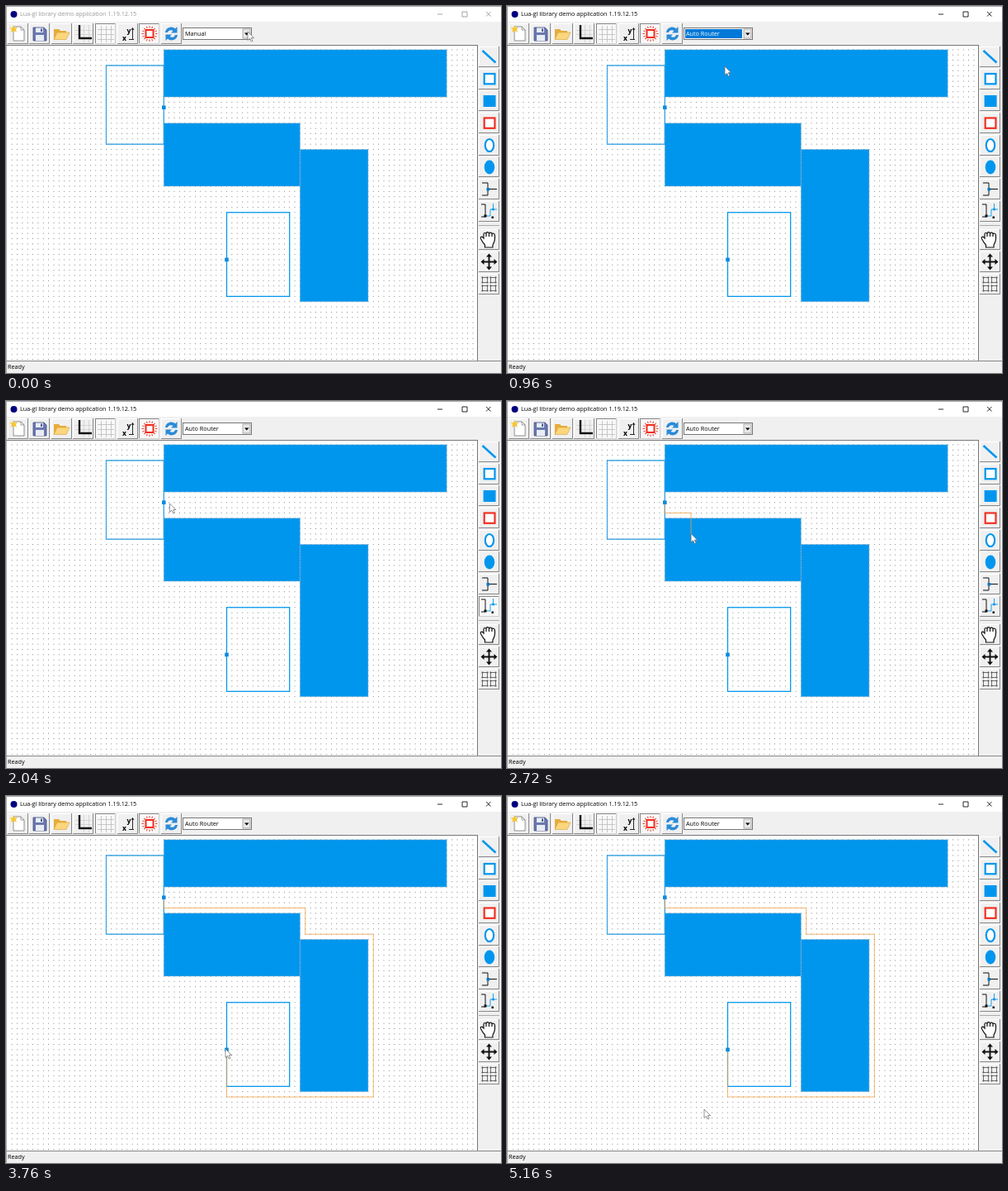
Animation of 600 by 444 pixels, one loop 5.2 s. Source, as an HTML page:

```html
<!DOCTYPE html>
<html lang="en">
<head>
<meta charset="utf-8">
<title>Drawing demo</title>
<style>
html, body { margin: 0; width: 100%; height: 100%; overflow: hidden; background: #fff; }
svg { display: block; width: 600px; height: 444px; }
text { font: 7.25px "Open Sans", "Noto Sans", sans-serif; fill: #000; }
.line { fill: none; stroke: #0096ee; }
.ink { fill: none; stroke: #111; }
.crisp { shape-rendering: crispEdges; }
</style>
</head>
<body>
<svg viewBox="0 0 600 444">
  <!-- window -->
  <rect width="600" height="444" fill="#fff"/>
  <path d="M0 19H600V48H0ZM571 48H600V444H571ZM0 429H600V444H0Z" fill="#f0f0f0"/>
  <path d="M0 .5H600M.5 0V444" stroke="#aaa" class="crisp"/>
  <circle cx="9.5" cy="10" r="4" fill="#00007c"/>
  <text id="title" x="17" y="12.4">Lua-gl library demo application 1.19.12.15</text>
  <path id="controls" d="M523 10H529M553 7H559V13H553ZM582 7L587.500 12.500M587.500 7L582 12.500" fill="none" stroke-width=".9"/>
  <text x="2" y="439">Ready</text>

  <!-- drawing area -->
  <g id="grid" stroke="#444" stroke-width=".8" stroke-dasharray=".8 5.55"></g>
  <path d="M0 47.500H571.500V429" fill="none" stroke="#777" class="crisp"/>
  <path d="M0 429.500H600" stroke="#888" class="crisp"/>
  <g id="shapes"></g>
  <path id="route" fill="none" stroke="#f0a040" stroke-width=".9" opacity=".85"/>
  <g id="ports"></g>

  <!-- buttons and their icons -->
  <g id="buttons" class="crisp"></g>
  <path d="M573 265.500H598" stroke="#aaa" class="crisp"/>

  <path d="M9 25H18L22 29V42H9Z" fill="#fff" stroke="#777" stroke-width=".8"/>
  <path d="M18 25V29H22" fill="none" stroke="#777" stroke-width=".7"/>
  <path d="M9 23L10.500 26.500L14 26L11.800 28.600L13 32L9.500 30L6 32L7 28.500L4.500 26L8 26.500Z" fill="#f8c52c"/>

  <path d="M33 26H46L49 29V42H33Z" fill="#6a78b0" stroke="#444f80" stroke-width=".8"/>
  <path d="M36 26.500H45V32H36ZM36 35H46V42H36Z" fill="#e8edf5"/>
  <path d="M42 27.500H44V31H42Z" fill="#4d628f"/>

  <path d="M58 28H64L66 30H73V40H58Z" fill="#e6ad3b"/>
  <path d="M58 40.500L62 32H77L73 40.500Z" fill="#fbd67c" stroke="#d9a23b" stroke-width=".6"/>

  <path d="M84 29.500H104M84 34.500H104M94.500 23V44M100.500 23V44" stroke="#ccc" stroke-width=".7"/>
  <path d="M89 23V39H104" class="ink" stroke-width="2.400"/>
  <path d="M111 28.500H131M111 34.500H131M111 40.500H131M115.500 24V44M121.500 24V44M127.500 24V44" stroke="#bbb" stroke-width=".8"/>

  <path d="M153.500 27V40M152 29L153.500 26.500L155 29M149 40.500H155" class="ink" stroke-width=".9"/>
  <text x="146.500" y="32.500" style="font-size:8.500px;font-weight:700">y</text>
  <text x="141" y="41.500" style="font-size:8.500px;font-weight:700">x</text>

  <rect x="169.500" y="29" width="9" height="9" fill="#fff" stroke="#f32c1e" stroke-width="2"/>
  <g id="rays" stroke="#e54236" stroke-width="1"></g>

  <g fill="#2a8bd8">
    <path id="half" d="M193 32C194 25 202 24 205 27.500L207.500 25V32.500H200L202.500 30C200 28.500 197 29 196 32Z"/>
    <use href="#half" transform="rotate(180 200.500 33.500)"/>
  </g>

  <path d="M577.500 54L593.500 68.500" class="line" stroke-width="2.500"/>
  <rect x="579.700" y="82" width="12.800" height="12.300" fill="#fff" stroke="#0096ee" stroke-width="2.200"/>
  <rect x="578.600" y="108" width="15" height="14" fill="#0096ee"/>
  <rect x="579.700" y="135.500" width="12.800" height="12.300" fill="#fff" stroke="#f03024" stroke-width="2.200"/>
  <ellipse cx="586" cy="168.500" rx="5.200" ry="7.500" fill="#fff" stroke="#0096ee" stroke-width="2.200"/>
  <ellipse cx="586" cy="195" rx="6.300" ry="8.500" fill="#0096ee"/>

  <path d="M577 214H584V229H577M584 221.500H595" class="ink" stroke-width="1"/>
  <rect x="582.500" y="220" width="3.500" height="3.500" fill="#0878c8"/>

  <path d="M576 240H581V255H576" class="ink" stroke-width="1"/>
  <path d="M581 254H587V246H595M590.500 239V246" class="line" stroke-width=".9"/>
  <path d="M579.500 252.500h3v3h-3ZM588.500 254.500h2.500v2.500h-2.500Z" fill="#111"/>
  <circle cx="590.500" cy="246" r="1.500" fill="#0096ee"/>

  <path d="M579 286L576.500 281.500C575.500 279 578 278.500 579 280L580 281V276C580 274 583 274 583 276C583 273 586.500 273 586.500 275.500C587 273.500 590 273.500 590 276C590.500 274.500 593.500 275 593.500 277.500C594 283 593 286 591 289V292H581.500V289ZM583 276V279M586.500 275.500V279M590 276V279" fill="#fff" stroke="#111" stroke-width="1.200" transform="translate(-1 0)"/>

  <path d="M578 309.500H593M585.500 302V317" class="ink" stroke-width="1.900"/>
  <path d="M585.500 299.500L589 303.500H582ZM585.500 319.500L589 315.500H582ZM575.500 309.500L579.500 306V313ZM595.500 309.500L591.500 306V313Z" fill="#111"/>
  <g id="group" fill="none" stroke="#555" stroke-width=".8"></g>

  <!-- router list -->
  <rect x="214.500" y="26.500" width="83" height="14" fill="#fff" stroke="#777" class="crisp"/>
  <rect x="287" y="28" width="9" height="11" fill="#e8e8e8" stroke="#999" stroke-width=".8"/>
  <path d="M289 32.500H294.500L291.750 35.500Z" fill="#000"/>
  <rect id="focus" x="216" y="28" width="69" height="11" fill="#0078d7" class="crisp"/>
  <text id="choice" x="217" y="36"></text>
  <g id="menu">
    <rect x="214.500" y="40.500" width="83" height="39" fill="#fff" stroke="#444" class="crisp"/>
    <rect id="mark" x="215" width="82" height="9.600" fill="#0078d7"/>
  </g>

  <path id="cursor" d="M0 0V10.500L2.500 8.300L4.300 12L6 11.200L4.300 7.600H7.600Z" fill="#fff" stroke="#666" stroke-width=".7"/>
</svg>

<script>
const $ = id => document.getElementById(id);
const LOOP = 5200, STEP = 6.35;
const gridX = col => 0.8 + col * STEP;
const gridY = row => 2.1 + row * STEP;
const modes = ["Manual", "Manual Orthogonal", "Guided Orthogonal", "Auto Router"];

function add(parent, tag, attrs) {
  const el = document.createElementNS("http://www.w3.org/2000/svg", tag);
  for (const key in attrs) el.setAttribute(key, attrs[key]);
  return $(parent).appendChild(el);
}

// all shapes sit on the grid: column, row, columns, rows
function box(col, row, cols, rows, attrs) {
  add("shapes", "rect", {
    x: gridX(col), y: gridY(row), width: cols * STEP, height: rows * STEP, ...attrs
  });
}

function polyline(points) {
  return "M" + points.map(([col, row]) => `${gridX(col)} ${gridY(row)}`).join("L");
}

for (let row = 8; row < 68; row++)
  add("grid", "path", { d: `M${gridX(1) - .4} ${gridY(row)}H570` });

const dashes = { fill: "none", "stroke-dasharray": "1.9 1.275" };
for (const block of [[30, 8, 54, 9], [30, 22, 26, 12], [56, 27, 13, 29]]) {
  box(...block, { fill: "#0096ee" });
  box(...block, { ...dashes, stroke: "#8fb2c8", "stroke-width": .8 });
}
box(19, 11, 11, 15, { class: "line", "stroke-width": 1.1 });
box(19, 11, 11, 15, { ...dashes, stroke: "#6fa6cc", "stroke-width": .8 });
box(42, 39, 12, 16, { class: "line", "stroke-width": 1.27 });
for (const [col, row] of [[30, 19], [42, 48]])
  add("ports", "rect", { x: gridX(col) - 2.3, y: gridY(row) - 2.3, width: 4.6, height: 4.6, fill: "#0a8bdc" });

function button(x, y, down) {
  const face = add("buttons", "rect", { x, y, width: 25, height: 25 });
  const light = add("buttons", "path", { d: `M${x + .5} ${y + 25}V${y + .5}H${x + 25}`, fill: "none" });
  const dark = add("buttons", "path", { d: `M${x} ${y + 24.5}H${x + 24.5}V${y}`, fill: "none" });
  const press = on => {
    face.setAttribute("fill", on ? "#f8f8f8" : "#f0f0f0");
    light.setAttribute("stroke", on ? "#888" : "#fff");
    dark.setAttribute("stroke", on ? "#ccc" : "#888");
  };
  press(down);
  return press;
}
for (let i = 0; i < 8; i++) button(Math.round(1.5 + i * 26.6), 21, i == 4 || i == 6);
const side = [49, 76, 102, 129, 156, 182, 209, 236, 270, 297, 324].map(y => button(573, y, false));
const pressRoute = side[7];

for (let i = 0; i < 16; i++)
  add("rays", "path", { d: "M174 24V26.500", transform: `rotate(${i * 22.5} 174 33.500)` });

for (const x of [577.5, 587.5])
  for (const y of [328.5, 338.5]) {
    add("group", "rect", { x, y, width: 6, height: 6 });
    for (const dx of [0, 6])
      for (const dy of [0, 6]) add("group", "circle", { cx: x + dx, cy: y + dy, r: .8 });
  }

const items = modes.map((name, i) => {
  const el = add("menu", "text", { x: 217, y: 48.8 + i * 9.6 });
  el.textContent = name;
  return el;
});

// time, x, y of the pointer tip
const track = [
  [0, 293, 31], [440, 293, 31], [780, 264, 73], [980, 264, 73],
  [1440, 585, 246], [1640, 585, 246], [2030, 198.5, 124], [2160, 192, 122],
  [2320, 192, 123], [2700, 223, 160], [3260, 238.5, 292], [3700, 266, 306],
  [4200, 266, 306], [4860, 260, 335], [5120, 239, 379], [LOOP, 239, 379]
];
// the router trails behind the pointer
const routes = [
  [0, ""],
  [2440, polyline([[30, 19], [30, 21], [32, 21]])],
  [2700, polyline([[30, 19], [30, 21], [35, 21], [35, 25]])],
  [3480, polyline([[30, 19], [30, 21], [57, 21], [57, 26], [70, 26], [70, 57], [42, 57], [42, 48]])]
];

function pointer(t) {
  const i = track.findIndex(p => p[0] > t);
  const [t0, x0, y0] = track[i - 1], [t1, x1, y1] = track[i];
  const u = (t - t0) / (t1 - t0), k = u * u * (3 - 2 * u);
  return [x0 + (x1 - x0) * k, y0 + (y1 - y0) * k];
}

const show = (id, on) => $(id).setAttribute("visibility", on ? "visible" : "hidden");

function draw(t) {
  const [x, y] = pointer(t);
  const active = t >= 360, chosen = t >= 860, focused = chosen && t < 1580;
  $("cursor").setAttribute("transform", `translate(${x} ${y})`);
  $("title").style.fill = active ? "#000" : "#999";
  $("controls").setAttribute("stroke", active ? "#111" : "#999");

  $("choice").textContent = modes[chosen ? 3 : 0];
  $("choice").style.fill = focused ? "#fff" : "#000";
  show("focus", focused);
  show("menu", active && !chosen);
  const hover = Math.max(0, Math.min(3, Math.floor((y - 41) / 9.6)));
  $("mark").setAttribute("y", 41 + hover * 9.6);
  items.forEach((el, i) => el.style.fill = i == hover ? "#fff" : "#000");

  pressRoute(t >= 1560 && t < 2200);
  $("route").setAttribute("d", routes.findLast(r => t >= r[0])[1]);
}

const start = performance.now();
function tick() {
  draw((performance.now() - start) % LOOP);
  requestAnimationFrame(tick);
}
tick();
</script>
</body>
</html>
```
